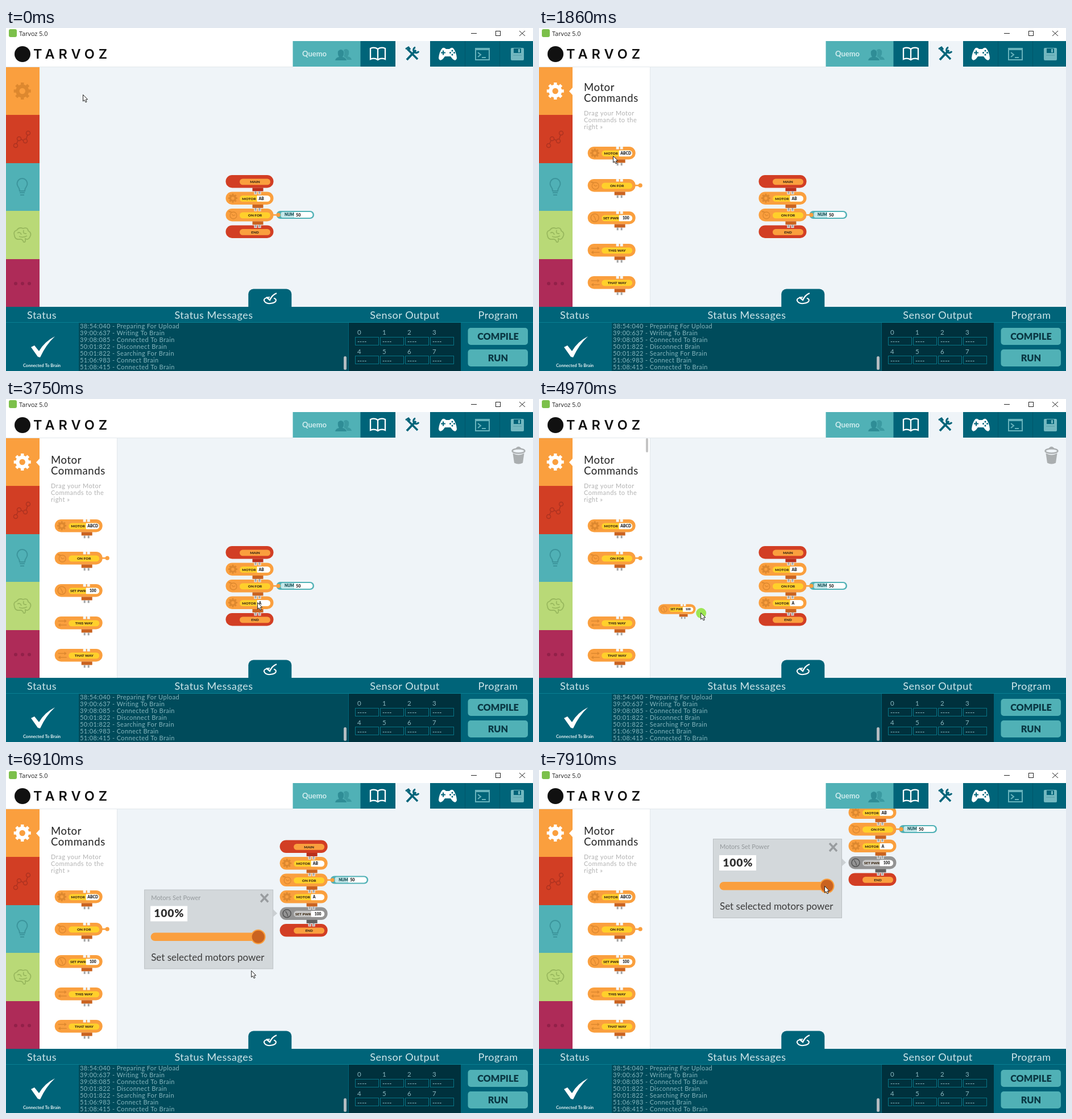
An HTML page with a canvas that plays this animation: 927 px wide and 604 px high, repeating every 8000 ms.

```html
<!DOCTYPE html>
<html lang="en">
<head>
<meta charset="utf-8">
<title>Block editor</title>
<style>
html, body { margin: 0; width: 100%; height: 100%; overflow: hidden; background: #fff; }
canvas { display: block; }
</style>
</head>
<body>
<canvas id="stage" width="927" height="604"></canvas>
<script>
const g = document.getElementById('stage').getContext('2d');
const LOOP = 8000, ROW = 29.5;
const TEAL = '#006479', AQUA = '#50b1b6', BG = '#eff4f8', ORANGE = '#fa9f3e',
      RED = '#d23e24', BROWN = '#ca6320', YELLOW = '#ffd02b', DIM = '#dd882f';

// Drawing helpers
function rect(x, y, w, h, color, r = 0) {
  g.fillStyle = color;
  g.beginPath(); g.roundRect(x, y, w, h, r); g.fill();
}
function circle(x, y, r, color) {
  g.fillStyle = color;
  g.beginPath(); g.arc(x, y, r, 0, 7); g.fill();
}
function ring(x, y, r, color, width = 1) {
  g.strokeStyle = color; g.lineWidth = width;
  g.beginPath(); g.arc(x, y, r, 0, 7); g.stroke();
}
function trace(points) {
  g.beginPath();
  for (let i = 0; i < points.length; i += 2) g.lineTo(points[i], points[i + 1]);
}
function line(points, color, width = 1) {
  g.strokeStyle = color; g.lineWidth = width;
  trace(points); g.stroke();
}
function poly(points, color) {
  g.fillStyle = color;
  trace(points); g.closePath(); g.fill();
}
function path(d, color, width) {
  const p = new Path2D(d);
  g.fillStyle = g.strokeStyle = color;
  if (width) { g.lineWidth = width; g.stroke(p); } else g.fill(p);
}
function text(str, x, y, size, color, weight = 400, align = 'left', spacing = 0, family = 'Lato') {
  g.font = `${weight} ${size}px ${family}, sans-serif`;
  g.letterSpacing = spacing + 'px';
  g.textAlign = align; g.fillStyle = color;
  g.fillText(str, x, y);
}
function at(x, y, draw, scale = 1, alpha = 1) {
  g.save();
  g.translate(x, y); g.scale(scale, scale); g.globalAlpha = alpha;
  draw();
  g.restore();
}

// Timing helpers
const ramp = (t, from, to) => Math.min(1, Math.max(0, (t - from) / (to - from)));
const during = (t, from, to) => t >= from && t < to;
function track(keys, t) {
  let i = 1;
  while (i < keys.length - 1 && t > keys[i][0]) i++;
  const a = keys[i - 1], b = keys[i], p = ramp(t, a[0], b[0]);
  return a.slice(1).map((v, k) => v + (b[k + 1] - v) * p);
}

const cursorKeys = [
  [70, 135, 117], [610, 52, 111], [1000, 52, 111], [1550, 132, 209], [1710, 130, 225], [1900, 130, 225],
  [2630, 351, 352], [2800, 363, 355], [3420, 442, 358], [3970, 442, 358], [4230, 300, 365], [4500, 148, 336],
  [4730, 148, 336], [4970, 284, 376], [5510, 409, 387], [5810, 435, 393], [6520, 435, 393],
  [6910, 431, 353], [7290, 476, 331], [7370, 476, 331], [7910, 502, 204]];
const drags = [
  { start: 1900, end: 3750, item: 0, block: { label: 'MOTOR', value: 'A', icon: 'gear' },
    keys: [[1900, 128, 220], [2800, 359, 351.5], [3420, 438, 354.5]] },
  { start: 4730, end: 5960, item: 2, block: { label: 'SET PWR', value: '100', icon: 'dial' },
    keys: [[4730, 128, 337], [4970, 242.5, 370], [5510, 403, 386], [5810, 428.5, 388.5]] }];
const items = [
  { label: 'MOTOR', value: 'ABCD', icon: 'gear' },
  { label: 'ON FOR', icon: 'clock', stub: true },
  { label: 'SET PWR', value: '100', icon: 'dial' },
  { label: 'THIS WAY', icon: 'arrows' },
  { label: 'THAT WAY', icon: 'arrows' }];

function gear(x, y, r, color) {
  ring(x, y, r * .56, color, r * .42);
  for (let i = 0; i < 8; i++) {
    const c = Math.cos(i * Math.PI / 4), s = Math.sin(i * Math.PI / 4);
    line([x + c * r * .7, y + s * r * .7, x + c * r, y + s * r], color, r * .36);
  }
}
const blockIcons = {
  gear: c => gear(12.5, 11.2, 8, c),
  clock(c) {
    ring(13.5, 12, 6, c, 1.3);
    line([10.5, 10, 13.5, 12.5, 17, 11], c, 1.2);
    line([5, 5, 10, 6], c, 2);
  },
  dial(c) {
    ring(12.5, 11.2, 7, c, 1.6);
    line([10, 7, 13, 12, 14, 16], c, 1.4);
  },
  arrows(c) {
    line([6, 8, 18, 8], c, 1.5); poly([17, 5, 21, 8, 17, 11], c);
    line([9, 15, 21, 15], c, 1.5); poly([10, 12, 6, 15, 10, 18], c);
  }
};

// A block's origin is the top left of its 84 x 22.4 body.
function block({ label, value, icon, end, stub, num, grey }) {
  const cap = end || label === 'MAIN';
  rect(0, 0, 84, 22.4, grey ? '#939393' : cap ? RED : ORANGE, 11.2);
  if (label !== 'MAIN') for (const x of [50, 57]) rect(x, -.5, 5, 5, '#f5f8fa');
  if (!end) {
    rect(47, 22.4, 19, 6, grey ? '#606060' : cap ? '#b92f1c' : BROWN);
    for (const x of [51, 58]) rect(x, 28.4, 3, 4.8, '#a3a5a6');
  }
  if (icon) blockIcons[icon](grey ? '#555' : DIM);
  rect(24.5, 6.5, 54, 10.8, grey ? '#c8c8c8' : cap ? ORANGE : YELLOW, 5.4);
  const ink = '#3c2a14';
  if (value) {
    const short = value.length < 3;
    rect(55, 6.5, 23.5, 10.8, '#fff', [1, 5.4, 5.4, 1]);
    text(label, 41, 14.3, 6.4, ink, 900, 'center');
    text(value, short ? 58 : 67, 14.3, 6.7, '#222', 900, short ? 'left' : 'center');
  } else text(label, 51.5, 14.3, 6.4, ink, 900, 'center');
  if (num) {
    rect(89, 4, 66.5, 14, AQUA, 7);
    rect(97, 6, 24, 10, '#c5e8ea', 3);
    rect(120, 6, 33, 10, '#fff', [0, 5, 5, 0]);
    text('NUM', 103.5, 13.4, 6.7, '#134a50', 900);
    text('50', 123.5, 13.5, 7.2, '#222', 900);
  }
  if (stub) {
    line([83, 11.2, 92, 11.2], ORANGE, 2.6);
    circle(92.5, 11.2, 3.6, ORANGE);
  }
}

function chain(t) {
  const blocks = [{ label: 'MAIN' }, { label: 'MOTOR', value: 'AB', icon: 'gear' },
    { label: 'ON FOR', icon: 'clock', stub: true, num: true }];
  if (t >= 3200) blocks.push(drags[0].block);
  if (t >= 5580) blocks.push({ ...drags[1].block, grey: t >= 6520 });
  blocks.push({ label: 'END', end: true });
  for (let i = blocks.length - 1; i >= 0; i--) at(386.5, 259 + i * ROW, () => block(blocks[i]));
}

function dialog() {
  rect(.5, .5, 226, 139, '#d3d8db');
  g.strokeStyle = '#bcc1c4'; g.lineWidth = 1; g.strokeRect(.5, .5, 226, 139);
  poly([227, 35, 234, 42, 227, 48], '#cbd0d3');
  text('Motors Set Power', 12, 18, 11, '#94999c');
  line([205, 8, 218, 22], '#989c9f', 3.4);
  line([218, 8, 205, 22], '#989c9f', 3.4);
  rect(11, 29, 65, 27, '#fff');
  text('100%', 43.7, 48.5, 19.5, '#333', 900, 'center', .7);
  rect(11.5, 76, 195, 14.5, ORANGE, 7.2);
  circle(200.5, 83.2, 13, ORANGE);
  circle(200.5, 83.2, 11, BROWN);
  text('Set selected motors power', 12, 125, 17, '#3c3c3c');
}

function trash() {
  const c = '#aaaeb0';
  path('M-10,-4 Q0,2 10,-4 L7.5,13 Q0,17 -7.5,13 Z', c);
  path('M-11,-8 A11,4 0 1 0 11,-8 A11,4 0 1 0 -11,-8 M-4,-12 Q0,-17 4,-12', c, 2.3);
}

function panel(t) {
  const slide = 1 - (1 - ramp(t, 780, 1150)) ** 3;
  const scroll = Math.round(track([[1900, 0], [2630, 2], [2850, 2], [3200, 3]], t)[0]);
  g.save();
  g.beginPath(); g.rect(59, 69, 137, 423); g.clip();
  g.translate(-136 * (1 - slide), 0);
  rect(59, 69, 136, 423, '#fff');
  rect(195, 69, 1, 423, '#e2e7ea');
  if (drags.some(d => during(t, d.start, d.start + 400))) rect(188, 69, 4, 25, '#c4c4c4', 2);
  g.translate(0, scroll);
  text('Motor', 79, 111, 18.5, '#222', 400, 'left', .6);
  text('Commands', 79, 130, 18.5, '#222', 400, 'left', .6);
  ['Drag your Motor', 'Commands to the', 'right »'].forEach((s, i) =>
    text(s, 79, 154 + i * 12.2, 11, '#b2b2b2', 400, 'left', .5));
  items.forEach((item, i) => {
    const drag = drags.find(d => d.item === i && t >= d.start);
    const size = drag ? ramp(t, drag.start + 240, drag.start + 480) : 1;
    if (size) at(127.7, 220.2 + i * 57, () => { g.translate(-42, -11.2); block(item); }, size);
  });
  g.restore();
}

function sidebar(open) {
  const tops = [69, 153, 238, 322, 407, 492];
  [ORANGE, RED, AQUA, '#b9d977', '#ae2b58'].forEach((c, i) => rect(0, tops[i], 59, tops[i + 1] - tops[i], c));
  gear(28.7, 111, 15, open ? '#fff' : DIM);
  if (open) poly([59, 105, 53, 111.5, 59, 118], '#fff');
  const red = '#ad3220';
  line([17, 207, 23, 194, 34, 200, 39, 185], red, 1.5);
  [[17, 207], [23, 195], [34, 199], [39, 185]].forEach(([x, y]) => { circle(x, y, 4, RED); ring(x, y, 3.5, red, 1.5); });
  path('M24,287 Q24,283 21,279 A9,9 0 1 1 36,279 Q33,283 33,287 Z M24,290 H33 M25,294 H32', '#3c959c', 2);
  path('M15,366 Q12,358 19,356 Q23,350 30,353 Q38,350 39,357 Q46,361 42,368 Q39,374 34,371 Q35,378 31,377 ' +
    'Q29,371 24,372 Q16,373 15,366 M20,361 Q25,358 27,364 M31,356 Q29,363 36,362 M23,367 Q30,370 37,366', '#98b85d', 1.8);
  for (const x of [17, 29, 41]) circle(x, 450, 3, '#922149');
}

function header() {
  rect(0, 0, 927, 68, '#fff');
  rect(0, 68, 505, 1, '#e3e8ec');
  rect(5, 2, 14, 14, '#7cc04b', 3);
  text('Tarvoz 5.0', 23, 14, 10.8, '#222', 400, 'left', 0, 'Open Sans');
  line([818, 9.5, 828, 9.5], '#222');
  g.strokeRect(861.5, 5.5, 8, 8);
  line([903, 5, 913, 14], '#222'); line([913, 5, 903, 14], '#222');
  circle(29, 46, 14, '#111');
  text('TARVOZ', 48, 54, 23.5, '#111', 600, 'left', 7, 'Inter');

  rect(504.5, 23, 119.5, 45, AQUA);
  text('Quemo', 521, 50, 13, '#d0ecee', 700);
  const person = 'M-10,10 Q-9,5 -3,4 Q-6,0 -5,-6 Q0,-12 5,-6 Q6,0 3,4 Q9,5 10,10 Z';
  at(598, 46, () => path(person, '#3b9aa1'));
  at(589, 47, () => { path(person, AQUA, 2); path(person, '#2f8d96'); });
  rect(623.5, 23, 61.5, 45, TEAL);
  rect(685, 23, 61, 46, BG);
  rect(746, 23, 181, 45, TEAL);
  for (const x of [807, 868]) rect(x, 23, 1, 45, '#00566a');
  path('M641,36 Q648,33 654,37 Q660,33 667,36 V55 Q660,52 654,56 Q648,52 641,55 Z M654,37 V56', '#fff', 2.3);
  line([706, 37, 724, 55], TEAL, 3.6);
  line([705, 56, 721, 39], TEAL, 4);
  path('M720,34 A5,5 0 1 0 726,41 M703,37 L708,34 L711,38', TEAL, 3);
  path('M767,36 Q770,33 774,37 H780 Q784,33 787,36 Q792,42 793,53 Q791,60 785,54 L782,50 H772 L769,54 Q763,60 761,53 Q762,42 767,36', '#fff');
  line([765, 43.5, 773, 43.5], TEAL, 2); line([769, 39.5, 769, 47.5], TEAL, 2);
  for (const [x, y] of [[785, 40], [785, 47], [781.5, 43.5], [788.5, 43.5]]) circle(x, y, 1.5, TEAL);
  g.strokeStyle = '#68b3bc'; g.lineWidth = 2; g.strokeRect(826, 36, 24, 20);
  rect(826, 35, 24, 4, '#68b3bc');
  line([830, 43, 835, 47, 830, 51], '#68b3bc', 2); line([837, 52, 844, 52], '#68b3bc', 2);
  rect(888, 35, 23, 22, '#73b8c0', 2);
  rect(893, 36, 13, 8, TEAL); rect(901, 37, 3, 6, '#73b8c0');
  line([892, 48, 907, 48], '#559ca6');
}

function footer() {
  rect(426.3, 459.6, 76, 33, TEAL, [9, 9, 0, 0]);
  path('M464,474 Q453,475 454,480 Q457,486 465,485 Q475,484 475,479 Q474,476 471,476', '#fff', 2);
  path('M458,474 L464,479 Q468,470 476,467', '#fff', 2.4);
  rect(0, 491, 927, 113, TEAL);
  rect(0, 518, 927, 1, '#087f92');
  rect(128, 519, 474, 85, '#004b5b');
  rect(603, 519, 197, 85, '#00313d');
  [['Status', 63], ['Status Messages', 365.5], ['Sensor Output', 701.5], ['Program', 865.5]].forEach(([s, x]) =>
    text(s, x, 512, 18, '#cfe6ea', 400, 'center', .5));
  path('M44,562 L50,559 L58,569 Q68,552 86,543 Q70,558 60,580 L56,579 Z', '#fff');
  text('Connected To Brain', 63, 596.5, 7.6, '#e4f1f3', 700, 'center');

  g.save();
  g.beginPath(); g.rect(128, 519, 474, 85); g.clip();
  ['38:54:040 - Preparing For Upload', '39:00:637 - Writing To Brain', '39:08:085 - Connected To Brain',
    '50:01:822 - Disconnect Brain', '50:01:822 - Searching For Brain', '51:06:983 - Connect Brain',
    '51:08:415 - Connected To Brain'].forEach((s, i) =>
    text(s, 130, 528.5 + i * 12.15, 11, '#85b6be', 400, 'left', .4));
  g.restore();
  rect(594, 578, 5, 24, '#b4bcc0', 2.5);

  for (let i = 0; i < 8; i++) {
    const x = 614 + i % 4 * 44, y = i < 4 ? 540 : 573.5;
    text(i, x + 4, y, 11.5, '#8ab8c0');
    g.strokeStyle = '#087486'; g.lineWidth = 1;
    g.strokeRect(x + .5, Math.floor(y) + 4.5, 41, 14);
    text('----', x + 4, y + 16, 11, '#a5cfd5');
  }
  [['COMPILE', 528], ['RUN', 566]].forEach(([s, y]) => {
    rect(812.5, y, 105.5, 30, AQUA, 5);
    text(s, 865.5, y + 21, 16.3, '#0a3844', 900, 'center');
  });
}

function cursor(t) {
  const [x, y] = track(cursorKeys, t);
  const pressed = drags.some(d => during(t, d.start, d.end)) || during(t, 6440, 6600);
  at(x, y, () => {
    if (pressed) { g.globalAlpha = .8; circle(1, 1, 9, '#88e22c'); g.globalAlpha = 1; }
    const arrow = [.5, .5, .5, 12, 3, 9.7, 5, 13.8, 7, 13, 5.2, 9, 8.6, 8.8, .5, .5];
    poly(arrow, '#fff');
    line(arrow, '#222', 1);
  });
}

function draw(t) {
  rect(0, 0, 927, 604, BG);
  if (t >= 780) panel(t);

  for (const { start, end, keys, block: shape } of drags) if (during(t, start, end)) {
    const [x, y] = track(keys, t);
    const [size] = track([[start, 1], [start + 240, .78], [start + 470, 1]], t);
    at(x, y, () => { g.translate(-42, -11.2); block(shape); }, size);
  }

  // The canvas scrolls along a straight line while the dialog is opening.
  const pan = 1 - (1 - ramp(t, 6520, 7290)) ** 1.3;
  at(158 * pan, -225 * pan, () => {
    chain(t);
    if (pan > .33) at(148, 346, dialog);
  });

  const bin = [[1960, 3970], [4790, 6110]].find(([a, b]) => during(t, a, b));
  if (bin) at(901.5, 99.5, trash, 1, ramp(t, bin[0], bin[0] + 150));
  sidebar(t >= 780);
  header();
  footer();
  cursor(t);
}

function tick() {
  draw(performance.now() % LOOP);
  requestAnimationFrame(tick);
}
tick();
</script>
</body>
</html>
```
